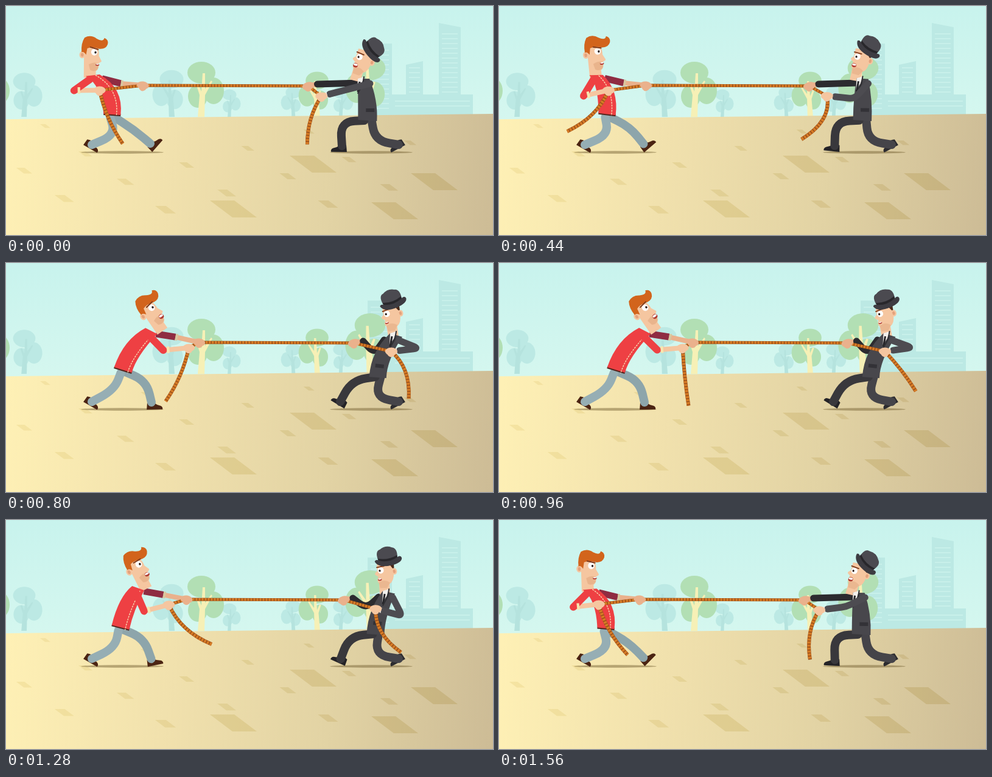
An HTML page with a canvas for the animation above (1.6 s loop, 800x378 px).

```html
<!DOCTYPE html>
<html lang="en">
<head>
<meta charset="utf-8">
<title>Tug of war</title>
<style>
html, body { margin: 0; overflow: hidden; background: #cdf5ee }
canvas { display: block }
</style>
</head>
<body>
<canvas id="stage" width="800" height="378"></canvas>
<script>
const g = document.getElementById('stage').getContext('2d');
const LOOP = 1600, SKIN = '#f5c6a0', FAR_SKIN = '#eab18c';
const SHIRT = '#ee4043', JEANS = '#96aeb4', BROWN = '#4b2413', SUIT = '#48474c', DARK = '#2c2b2f';
const PALE = '#bce9e4', LEAF = '#b2dfb4', TRUNK = '#f6f0b6';

const wave = (t, shift, times = 1) => Math.cos(2 * Math.PI * times * (t - shift) / LOOP);

// 0: the red shirt has the rope, 1: the dark suit has it.
let pull = 0;
const at = (x, y, dx, dy = 0) => [x + dx * pull, y + dy * pull];
const toward = (a, b, u) => [a[0] + (b[0] - a[0]) * u, a[1] + (b[1] - a[1]) * u];

// Elbow or knee between two ends, from the bone lengths.
function joint(a, b, upper, lower, side) {
  const dx = b[0] - a[0], dy = b[1] - a[1], d = Math.hypot(dx, dy);
  const along = (upper ** 2 - lower ** 2 + d * d) / (2 * d);
  const out = side * Math.sqrt(Math.max(0, upper ** 2 - along ** 2));
  return [a[0] + (dx * along - dy * out) / d, a[1] + (dy * along + dx * out) / d];
}

function fill(d, color) {
  g.fillStyle = color;
  g.fill(new Path2D(d));
}
function oval(x, y, rx, ry, color, turn = 0) {
  g.fillStyle = color;
  g.beginPath();
  g.ellipse(x, y, rx, ry, turn, 0, 7);
  g.fill();
}
function line(d, color, width, cap = 'round', dash = []) {
  g.strokeStyle = color;
  g.lineWidth = width;
  g.lineCap = cap;
  g.lineJoin = 'round';
  g.setLineDash(dash);
  g.stroke(new Path2D(d));
}
function limb(a, k, b, color, width, round = .5) {
  line(`M${a}L${toward(k, a, round)}Q${k} ${toward(k, b, round)}L${b}`, color, width);
}
function leg(hip, ankle, upper, lower, side, color) {
  limb(hip, joint(hip, ankle, upper, lower, side), ankle, color, 14, .6);
}
function placed([x, y], degrees, draw, sx = 1, sy = 1) {
  g.save();
  g.translate(x, y);
  g.rotate(degrees * Math.PI / 180);
  g.scale(sx, sy);
  draw();
  g.restore();
}
const shoe = (pos, turn, color, flip) => placed(pos, turn, () =>
  fill('M-8 6L-7-5Q0-8 4-5Q9-1 15 0Q19 2 18 6Z', color), flip);

function cuff(a, b, u, color, width) {
  line(`M${toward(a, b, u)}L${toward(a, b, u + .1)}`, color, width, 'butt');
}
function hand([x, y], color, turn) {
  oval(x, y, 10, 6.5, color, turn);
  line(`M${x - 4} ${y + 5}q3 4 7 1`, color, 4);
}

function tree(x, s, leaf = LEAF, trunk = TRUNK) {
  placed([x, 183], 0, () => {
    oval(0, -73, 23, 18, leaf);
    oval(-6, -34, 16, 19, leaf);
    oval(20, -43, 17, 22, leaf);
    fill('M-6 0L-3-36L-8-52L-5-53L0-42L2-72L6-72L6-46L16-60L18-58L6-36L5 0Z', trunk);
  }, s, Math.abs(s));
}

function gradient(x0, y0, x1, y1, ...colors) {
  const shade = g.createLinearGradient(x0, y0, x1, y1);
  colors.forEach((c, i) => shade.addColorStop(i / (colors.length - 1), c));
  return shade;
}

function tower(x, y, width, slope = 0) {
  fill(`M${x} ${y}l${width} ${slope}V182H${x}Z`, PALE);
  g.fillStyle = '#c8f0ea';
  for (let row = y + slope + 10; row < 172; row += 8) g.fillRect(x + 5, row, width - 10, 2);
}

function patch(x, y, size) {
  const w = 77 * size;
  fill(`M${x} ${y}h${w * .52}l${w * .48} ${28 * size}h${-w * .52}Z`,
    `rgba(${200 - x * .06},${165 - x * .05},50,${.12 + x / 12000 + size * .06})`);
}

function scenery() {
  g.fillStyle = gradient(0, 0, 0, 190, '#c8f3ed', '#d5f7ef');
  g.fillRect(0, 0, 800, 190);
  tower(594, 62, 40);
  tower(657, 97, 28, -6);
  tower(711, 28, 36, 7);
  tower(634, 146, 133);
  for (const [x, s] of [[30, .8], [272, -.85], [367, .5], [472, -.55], [550, .55]]) tree(x, s, PALE, '#b5e3de');
  for (const [x, s] of [[-31, 1], [321, 1], [511, -.82], [598, -1.1]]) tree(x, s);

  fill('M0 187L800 178V378H0Z', gradient(0, 240, 800, 340, '#fef0b5', '#f1e1ad', '#e2d3a4', '#cdbc96'));
  for (const [x, y] of [[466, 247], [665, 276], [335, 321], [600, 324]]) patch(x, y, 1);
  // Small stones, scattered evenly and larger towards the viewer
  for (let i = 0; i < 16; i++) {
    const y = 195 + i * 9;
    patch((i * .618 + .08) % 1 * 700, y, .22 + (y - 195) / 600);
  }
  for (const x of [191, 600]) oval(x, 241.5, 68, 2.2, 'rgba(120,100,55,.5)');
}

function face(x, look, browTilt) {
  oval(x, -34, 5, 5.3, '#fff');
  oval(x + look, -33.5, 1.6, 1.8, '#2b1a12');
  line(`M${x - 6} ${-40 - browTilt}L${x + 6} ${-40 + browTilt}`, '#7d3a1b', 1.9);
}
function ear(x) {
  oval(x, -30, 4.5, 5.5, SKIN);
  oval(x, -30, 2.2, 3, '#e4a27c');
}
function mouth(x, y, open) {
  oval(x, y, 3 + open, 1.5 + open * 2.2, '#b03a30');
  oval(x, y - 1, 2.5 + open, .8 + open, '#fff');
}

function redHead() {
  fill('M-10 6L-9-40L12-43Q15-34 14-28L18-20Q18-18 14-17L13-9Q11-5 9-4L9 6Z', SKIN);
  fill('M-2-15Q8-20 14-15L12-7Q6-2 0-6Z', 'rgba(205,140,95,.3)');
  ear(-12);
  fill('M-13-34Q-14-48-8-57Q2-62 11-55Q21-49 23-56Q30-53 28-46Q25-38 15-39Q4-43-4-40L-6-30Q-10-36-13-34Z', '#d2641c');
  face(7, 1.8, 2 - pull * 3);
  mouth(11.5, -14, pull);
}

function hatHead(hatTurn) {
  fill('M-10 6L-9-13Q-13-17-9-24L-14-28Q-14-31-10-33L-9-47H16L17-28Q16-14 8-10L7 6Z', SKIN);
  fill('M-9-14Q0-20 9-12L3-4L-8-5Z', 'rgba(205,140,95,.25)');
  fill('M8-48H19L18-32L14-38Z', '#4a2a1b');
  ear(18);
  face(-4, -1.6, 1 - pull * 2);
  mouth(-7, -19, 1 - pull);
  placed([10, -47], hatTurn, () => {
    fill('M-15 0Q-20-21-10-22Q0-28 10-22Q20-19 15 0Z', '#4b4a50');
    fill('M-16-8Q0-2 16-8L16 0H-15Z', '#28272b');
    fill('M-22-4Q-20-8-14-4Q0 2 15-4Q22-8 23-2Q22 6 4 7Q-18 8-22-4Z', '#3d3c42');
  });
}

function redShirt(grip) {
  const wrist = at(187, 128, 93, -6);
  line(`M${wrist}L${grip}`, FAR_SKIN, 8);
  line(`M${at(156, 120, 92, -3)}L${wrist}`, '#8f2c42', 11, 'butt');
  cuff(wrist, grip, 0, '#d8c79f', 11);

  shoe(at(241, 231, -2, 5), -50 * (1 - pull), BROWN);
  shoe([137, 228], 30, BROWN);
  leg(at(178, 184, 19, -4), at(237, 227, 2, 3), 37, 36, -1, '#8da5ab');
  leg(at(171, 184, 18, -3), [141, 229], 30, 42, -1, JEANS);

  placed(at(136, 112, 120, -5), -36 * pull, redHead, 1.05, 1.05);
  const backTop = at(129, 116, 102, -9), backHip = at(160, 178, 18, -6);
  const hem = at(188, 180, 19, 1), front = at(193, 135, 21, 20), collar = at(152, 113, 98, 4);
  line(`M${backHip}L${hem}`, '#54251d', 4, 'butt');
  fill(`M${backTop}Q${at(156, 130, 38, -4)} ${backHip}L${hem}Q${front} ${collar}Z`, SHIRT);
  g.save();
  g.translate(-7, 1);
  line(`M${collar}Q${front} ${hem}`, '#f8d8b0', 1.4, 'butt', [3, 1.5]);
  g.restore();
}

function darkSuit(grip) {
  const wrist = [grip[0] + 15, grip[1] - 3], farShoulder = at(580, 127, 42);
  line(`M${wrist}L${grip}`, FAR_SKIN, 8);
  limb(farShoulder, joint(farShoulder, wrist, 28, 28, -1), wrist, DARK, 11);

  shoe([646, 228], -28, DARK, -1);
  shoe(at(552, 235, 0, -4), 32 * pull, '#242327', -1);
  leg(at(600, 187, 16), [645, 229], 36, 39, 1, '#454449');
  leg(at(588, 189, 19, -1), at(552, 231, -3, -2), 39, 40, 1, '#39383c');

  placed(at(575, 118, 63, -2), 15 - 28 * pull, () => hatHead(40 * (1 - pull) ** 2 - 8 * pull));
  const lapel = at(577, 120, 55, -4), hem = at(609, 190, 16);
  fill(`M${lapel}Q${at(578, 150, 22, -5)} ${at(578, 188, 19)}L${hem}Q${at(611, 155, 15, 5)} ${at(596, 120, 56, 2)}Z`, SUIT);
  const [x, y] = lapel;
  fill(`M${x} ${y}l10-3l-4 12l-7 10z`, '#f3f0ec');
  line(`M${x + 3} ${y + 5}l-3 17`, '#252428', 3, 'butt');
  line(`M${x + 10} ${y - 3}l-2 12l-8 15`, '#303034', 2);
  placed(at(598, 172, 16, -2), 6 * pull, () => fill('M-7-3H7V3H-7Z', '#333237'));
}

function rope(d, width) {
  line(d, '#974c19', width, 'butt');
  line(d, '#d67b25', width - .6, 'butt', [3.5, 1.5]);
}
// Loose end hanging from a hand; angles are measured from straight down.
function tail([x, y], length, endAngle, bendAngle) {
  const point = (r, degrees) => {
    const a = degrees * Math.PI / 180;
    return [x + r * Math.sin(a), y + r * Math.cos(a)];
  };
  rope(`M${x} ${y}Q${point(length / 2, bendAngle)} ${point(length, endAngle)}`, 6);
}

function frame(t) {
  pull = .5 - .52 * wave(t, 180) - .085 * wave(t, 0, 3);
  const farL = at(223, 131, 96), nearL = at(151, 139, 152, 1);
  const farR = at(495, 132, 78), nearR = at(516, 149, 119, -3);

  scenery();
  redShirt(farL);
  darkSuit(farR);

  const swing = 48 * wave(t, 1330);
  tail(nearL, 96, swing, swing / 2);
  tail(nearR, 83, 2 - 40 * wave(t, 280), 8 - 42 * wave(t, 20));
  rope(`M${nearL}L${farL}L${farR}L${nearR}`, 5);
  hand(farL, FAR_SKIN, .15);
  hand(farR, FAR_SKIN, -.25);

  // Near arms pass in front of the rope
  const shoulderL = at(136, 121, 102), elbowL = joint(shoulderL, nearL, 32, 42, 1);
  line(`M${elbowL}L${nearL}`, SKIN, 8);
  line(`M${shoulderL}L${elbowL}`, SHIRT, 12);
  cuff(elbowL, nearL, .14, '#f6e6b0', 11);
  hand(nearL, SKIN, 0);

  const shoulderR = at(597, 128, 50), elbowR = joint(shoulderR, nearR, 34, 45, -1);
  const wristR = toward(nearR, elbowR, .3);
  line(`M${wristR}L${nearR}`, SKIN, 8);
  limb(shoulderR, elbowR, wristR, '#4d4c51', 11, .25);
  cuff(wristR, nearR, .3, '#f3f0ec', 9);
  hand(nearR, SKIN, 0);
}

function tick() {
  frame(performance.now() % LOOP);
  requestAnimationFrame(tick);
}
tick();
</script>
</body>
</html>
```
